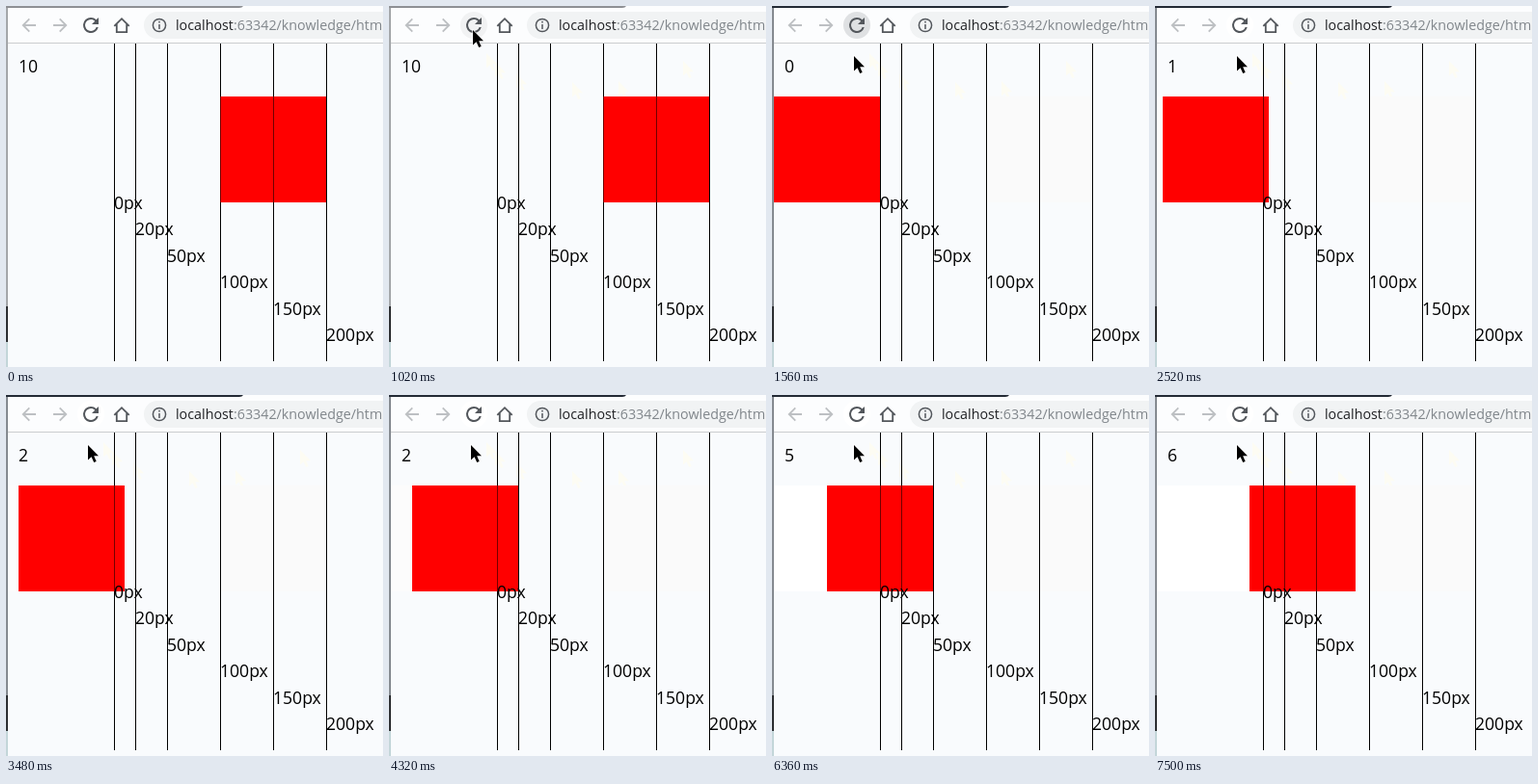
Animation, 391 px wide and 375 px high, one loop 8000 ms. Source, as an HTML page:

```html
<!DOCTYPE html>
<html lang="en">
<head>
<meta charset="utf-8">
<style>
  html, body { margin: 0; width: 100%; height: 100%; overflow: hidden; background: #f9fbfd; }
  svg { display: block; }
  text { font-family: "Open Sans", "Noto Sans", sans-serif; font-size: 17.6px; }
  .url { font-size: 14.3px; fill: #80868b; }
  .icon { fill: none; stroke: #53575c; stroke-width: 1.8; }
</style>
</head>
<body>
<svg width="391" height="375" viewBox="0 0 391 375">
  <defs>
    <path id="arrow" d="M0 0V15.5L3.6 12.2L6.2 18L8.7 16.9L6.2 11.2H11Z"/>
    <g id="lines"></g>
  </defs>

  <!-- window edge and toolbar -->
  <rect id="edge" width="2" height="375"/>
  <rect y="312" width="2" height="37" fill="#2c2e31"/>
  <rect y="349" width="2" height="26" fill="#c3d6d9"/>
  <rect x="2" width="389" height="38" fill="#fcfdfe"/>
  <path id="top" d="M0 0H246Q245 2 242 2H0Z"/>
  <rect x="2" y="38" width="389" height="1" fill="#cbcdcf"/>
  <rect x="143" y="6" width="280" height="28" rx="14" fill="#f1f3f4"/>
  <circle id="hover" cx="88" cy="20" r="14"/>
  <g class="icon">
    <path stroke="#bdc0c3" d="M31 20H18M24.3 13.4L17.7 20L24.3 26.6M49 20H62M55.7 13.4L62.3 20L55.7 26.6"/>
    <path d="M112.3 20.8L120 13.2L127.7 20.8M114.8 19V27.1H125.2V19"/>
    <path stroke-width="1.5" d="M159 19V24M159 15.7V17.4"/>
    <circle stroke-width="1.5" cx="159" cy="20" r="6.6"/>
  </g>
  <path transform="translate(76 8)" fill="#53575c"
    d="M17.65 6.35A7.96 7.96 0 0 0 12 4a8 8 0 1 0 7.73 10h-2.08A6 6 0 1 1 12 6c1.66 0 3.14.69 4.22 1.78L13 11h7V4z"/>
  <text class="url" x="176" y="25"><tspan fill="#202124">localhost</tspan>:63342/knowledge/htm</text>

  <!-- page -->
  <g id="trail" fill="#fdfcf3"></g>
  <rect id="faded" x="222" y="94" width="110" height="110" fill="#fafafa"/>
  <rect id="wake" x="2" y="94" height="110"/>
  <use href="#lines"/>
  <rect id="box" y="94" width="110" height="110" fill="#f00"/>
  <use href="#lines" opacity=".55"/>
  <g id="labels"></g>
  <text id="count" x="13" y="69"></text>
  <use id="cursor" href="#arrow" stroke="#fff" stroke-width="1.2" paint-order="stroke"/>
</svg>
<script>
const LOOP = 8000, LOAD = 1560, PRESS = 1260, STEP = 60;
const $ = id => document.getElementById(id);
const set = (id, attrs) => {
  for (const k in attrs) $(id).setAttribute(k, attrs[k]);
};

[0, 20, 50, 100, 150, 200].forEach((px, i) => {
  const x = Math.round(112 + px * 1.1);
  $('lines').innerHTML += `<rect x="${x}" y="39" width="1" height="330"/>`;
  $('labels').innerHTML += `<text x="${x}" y="${Math.round(211 + i * 27.4)}">${px}px</text>`;
});

// [time, x, y] of the pointer tip
const path = [
  [60, 365, 40], [120, 305, 57], [180, 238, 78], [240, 190, 79], [300, 132, 70],
  [360, 110, 58], [420, 101, 49], [540, 95, 42], [840, 90, 33], [1020, 87, 25],
  [1320, 87, 25], [1560, 85, 52]
];
const ghosts = path.slice(1, 7);
$('trail').innerHTML = ghosts.map(([, x, y]) =>
  `<use href="#arrow" x="${x}" y="${y}"/>`).join('');

// [time, left] of the box
const moves = [
  [0, 222], [LOAD, 2], [2160, 8], [2880, 13], [3660, 19], [4320, 24],
  [4800, 32], [5340, 41], [5820, 49], [6240, 57], [7500, 98]
];

function pointer(t) {
  const i = path.findIndex(p => p[0] > t);
  if (i < 0) return path[path.length - 1].slice(1);
  const [a, b] = [path[i - 1], path[i]];
  const k = (t - a[0]) / (b[0] - a[0]);
  return [1, 2].map(n => Math.round(a[n] + (b[n] - a[n]) * k));
}

function draw(t) {
  const loaded = t >= LOAD, focused = t >= PRESS;
  const left = moves.filter(m => m[0] <= t).pop()[1];
  const hover = t < 1020 ? 'none' : !focused ? '#f1f2f3' : t < 1920 ? '#dfe1e3' : '#fff';

  set('top', { fill: focused ? '#232a35' : '#8e9094' });
  set('edge', { fill: focused ? '#858a90' : '#a4a7aa' });
  set('hover', { fill: hover });
  set('box', { x: left });
  set('faded', { visibility: loaded ? 'visible' : 'hidden' });
  set('wake', { width: loaded ? left - 2 : 0, fill: t < 4800 ? '#fcfcfc' : '#fff' });
  $('count').textContent = loaded ? Math.floor((t - LOAD) / 960) : 10;

  const shown = t >= STEP;
  set('cursor', { visibility: shown ? 'visible' : 'hidden' });
  if (shown) {
    const [x, y] = pointer(Math.floor(t / STEP) * STEP);
    set('cursor', { x, y });
  }
  ghosts.forEach((g, i) => {
    $('trail').children[i].setAttribute('visibility', t >= g[0] + STEP ? 'visible' : 'hidden');
  });
}

const start = performance.now();
function tick() {
  draw((performance.now() - start) % LOOP);
  requestAnimationFrame(tick);
}
tick();
</script>
</body>
</html>
```
